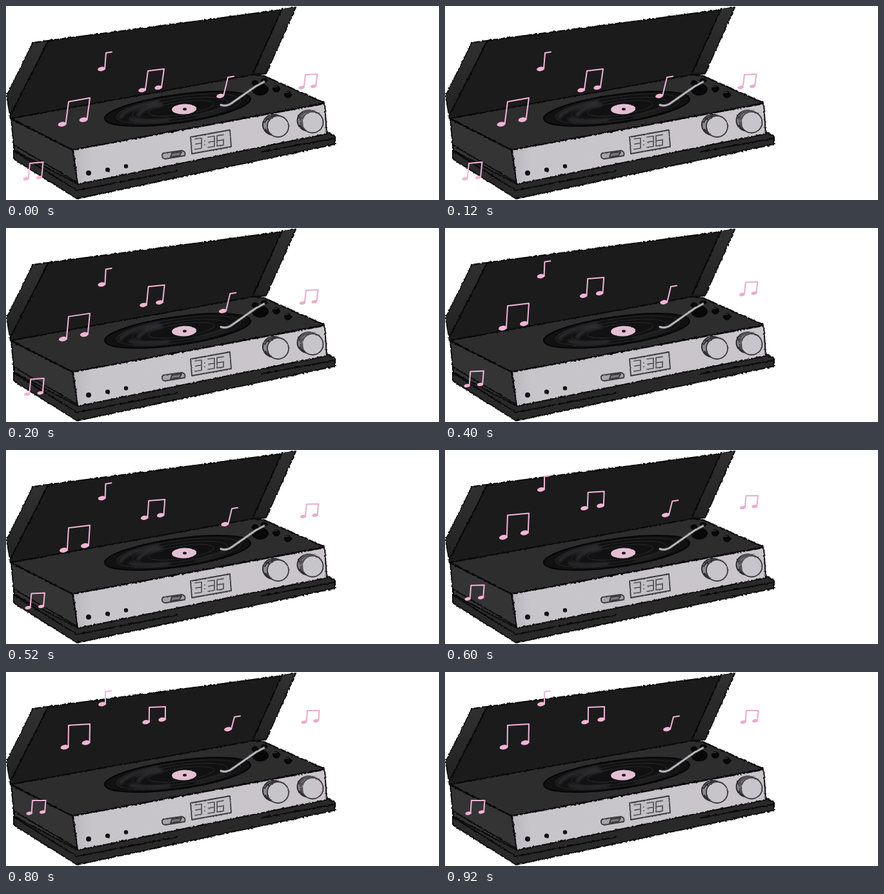
Animation of 671 by 302 pixels, one loop 1000 ms. Source, as an HTML page:

```html
<!DOCTYPE html>
<html lang="en">
<head>
<meta charset="utf-8">
<title>Record player</title>
<style>
html, body { margin: 0; width: 100%; height: 100%; overflow: hidden; background: #fff; }
svg { display: block; width: 100vw; height: 100vh; }
</style>
</head>
<body>
<svg viewBox="0 0 671 302" fill="none" stroke-linecap="round" stroke-linejoin="round">
  <defs>
    <filter id="rough" filterUnits="userSpaceOnUse" x="0" y="0" width="671" height="302" color-interpolation-filters="sRGB">
      <feTurbulence type="fractalNoise" baseFrequency=".28" numOctaves="2" seed="4" result="n"/>
      <feDisplacementMap in="SourceGraphic" in2="n" scale="3.6" xChannelSelector="R" yChannelSelector="G"/>
    </filter>
    <filter id="pencil" filterUnits="userSpaceOnUse" x="0" y="0" width="671" height="302" color-interpolation-filters="sRGB">
      <feTurbulence type="fractalNoise" baseFrequency=".35" numOctaves="2" seed="9" result="n"/>
      <feDisplacementMap in="SourceGraphic" in2="n" scale="2" xChannelSelector="R" yChannelSelector="G"/>
    </filter>
    <filter id="soft" x="-20%" y="-20%" width="140%" height="140%"><feGaussianBlur stdDeviation="2"/></filter>
    <linearGradient id="front" x1="0" x2="1">
      <stop offset="0" stop-color="#bab7bc"/><stop offset=".07" stop-color="#c8c5ca"/>
      <stop offset="1" stop-color="#c9c5ca"/>
    </linearGradient>
    <linearGradient id="flap" x1="0" y1="0" x2="0" y2="1">
      <stop offset="0" stop-color="#303031"/><stop offset="1" stop-color="#222223"/>
    </linearGradient>
  </defs>

  <!-- lid and case -->
  <g filter="url(#rough)" stroke="#080808" stroke-width="2">
    <path fill="#1b1b1c" d="M42 57 72 53 300 23 418 7 449 2 403 105 385 108 7 175 1 140Z"/>
    <path fill="url(#flap)" stroke="none" d="M42 58 64 55 12 158 6 169 2 139Z"/>
    <path fill="url(#flap)" stroke="none" d="M428 5 448 2 403 104 385 103Z"/>
    <path d="M65 55 8 168M428 4 383 104"/>
    <path fill="#29292a" d="M12 215 12 238 110 300 510 215 510 203 496 196 110 270Z"/>
    <path fill="#343435" d="M8 176 103 224 111 277 13 225Z"/>
    <path fill="#2d2d2e" d="M8 175 383 107 400 109 494 151 103 224Z"/>
    <path d="M13 217 108 273M14 227 110 287 265 257M396 227 509 206"/>
    <path fill="url(#front)" d="M104 224 494 152 497 199 111 277.500Z"/>
  </g>

  <g filter="url(#pencil)">
    <!-- record -->
    <g transform="rotate(-8 266 160)">
      <ellipse cx="266" cy="160" rx="114" ry="22" fill="#111112" stroke="#050505" stroke-width="2"/>
      <g filter="url(#soft)" stroke="#404043" stroke-width="4" opacity=".8">
        <path d="M176 161Q184 148 238 145M191 166Q212 175 250 175M204 162Q209 151 243 150"/>
        <path d="M292 176Q333 173 350 163" stroke="#29292b"/>
      </g>
      <g id="grooves" stroke="#29292b"></g>
    </g>
    <ellipse cx="276" cy="160.500" rx="19" ry="8" fill="#e4bfd3" transform="rotate(-3 276 160)"/>
    <ellipse cx="277" cy="160.500" rx="3" ry="2" fill="#151515"/>

    <!-- arm and buttons -->
    <g fill="#080808" stroke="#030303">
      <ellipse cx="394" cy="130" rx="12.500" ry="9"/><ellipse cx="386" cy="120" rx="5" ry="4"/>
      <ellipse cx="419" cy="129" rx="5.500" ry="5"/><ellipse cx="437" cy="138" rx="5.500" ry="5"/>
      <ellipse cx="400" cy="116" rx="5" ry="3"/>
    </g>
    <path d="M415 126l5-1M433 135l5-1" stroke="#4a4a4c"/>
    <g id="arm">
      <path d="M333 154Q342 157 350 151L387 125 400 118" stroke="#5a5a5d" stroke-width="4"/>
      <path d="M333 154Q342 157 350 151L387 125 400 118" stroke="#bdbbc0" stroke-width="2.400"/>
    </g>

    <!-- front panel -->
    <g fill="#111"><circle cx="128" cy="260" r="4"/><circle cx="157.500" cy="255" r="3.600"/><circle cx="186" cy="249.500" r="3.200"/></g>
    <g stroke="#39393b" stroke-width="1.800">
      <path fill="#a5a3a8" d="M244 229 273 225Q279 227 277 233L247 238Q241 238 242 231Z"/>
      <path fill="#79777b" d="M257 229 272 227 269 233 255 235Z"/>
      <path fill="#c2bfc4" d="M286 204 347 193 349 219 288 230Z"/>
      <g transform="matrix(1 -.15 0 1 293 207)" stroke="#515153" stroke-width="1.700">
        <path id="three" d="M0 0H10V16H0M1 8H10"/>
        <use href="#three" x="20"/>
        <path d="M44 0H34V16H44V8H34M15 5v.5M15 11v.5"/>
      </g>
    </g>
    <g id="dial">
      <ellipse cx="415" cy="185" rx="17" ry="16" fill="#8a888d" stroke="#2b2b2d" stroke-width="2"/>
      <path d="M401 181Q406 172 416 171M402 192 408 199M405 175l5 4" stroke="#2b2b2d" stroke-width="2"/>
      <circle cx="421.500" cy="187.500" r="16.500" fill="#c8c5ca" stroke="#38383a" stroke-width="1.800"/>
    </g>
    <use href="#dial" x="53.500" y="-6.500"/>
    <path d="M455 174Q457 162 470 161L481 163Q464 164 460 178L461 190Q453 185 455 174Z" fill="#545256"/>
    <path d="M458 172l6-5M456 180l5-4" stroke="#9a989c"/>
  </g>
  <g id="notes" stroke-width="2"></g>
</svg>
<script>
const LOOP = 1000, POSES = 5, PINK = "#f2b4d5";

// Head and stem top each travel from one point to another.
// A gap makes a pair: rise tilts the heads, beam tilts the bar (start, end).
const notes = [
  { head: [[87, 184], [91, 117]], top: [[97, 149], [97, 83]], size: 6.5, gap: 33, rise: -7, beam: [-6, -2], lag: .08 },
  { head: [[211, 131], [217, 78]], top: [[220, 101], [222, 55]], size: 5.8, gap: 25, rise: -4, beam: [-3, -1] },
  { head: [[31, 269], [36, 220]], top: [[37, 245], [41, 200]], size: 4.6, gap: 20.5, rise: -2, beam: [-2, 0] },
  { head: [[458, 127], [462, 78]], top: [[464, 107], [467, 60]], size: 4.5, gap: 18.5, rise: -2, beam: [-1, 0], color: "#e9accd" },
  { head: [[148, 98], [149, 50]], top: [[155, 73], [154, 31]], size: 6 },
  { head: [[332, 140], [344, 89]], top: [[344, 111], [354, 70]], size: 6 }
];

const layer = document.getElementById("notes");
const mix = (a, b, p) => a + (b - a) * p;

// Sideways drift leads a little; the climb starts slowly and settles at the end.
const drift = u => u + .1 * Math.sin(Math.PI * u);
const climb = (u, lag) => u - .025 * Math.sin(2 * Math.PI * u) - lag * Math.sin(Math.PI * u);

function oval(x, y, r, color) {
  return `<ellipse cx="${x}" cy="${y}" rx="${r}" ry="${r * .56}" fill="${color}" transform="rotate(-10 ${x} ${y})"/>`;
}

function drawNote({ head, top, size, gap, rise, beam, lag = .02, color = PINK }, u) {
  const at = ([a, b]) => [mix(a[0], b[0], drift(u)), mix(a[1], b[1], climb(u, lag))];
  const [x, y] = at(head), [tx, ty] = at(top);
  const foot = x + size - 1;
  let shapes = oval(x, y, size, color);
  let line = `M${foot} ${y}L${tx} ${ty}`;
  if (gap) {
    shapes += oval(x + gap, y + rise, size, color);
    line += `l${gap} ${mix(...beam, u)}L${foot + gap} ${y + rise}`;
  } else {
    line += "l9 -1.5";
  }
  return shapes + `<path d="${line}" stroke="${color}"/>`;
}

function drawGrooves() {
  let rings = "";
  for (let k = .45; k < .95; k += .2) {
    rings += `<ellipse cx="${mix(276, 266, k)}" cy="160" rx="${114 * k}" ry="${22 * k}"/>`;
  }
  document.getElementById("grooves").innerHTML = rings;
}

let shown = -1;
function draw(time) {
  const pose = Math.floor((time % LOOP) / LOOP * POSES);
  if (pose === shown) return;
  shown = pose;
  layer.innerHTML = notes.map(n => drawNote(n, pose / (POSES - 1))).join("");
}

const start = performance.now();
function tick() {
  draw(performance.now() - start);
  requestAnimationFrame(tick);
}
drawGrooves();
tick();
</script>
</body>
</html>
```
